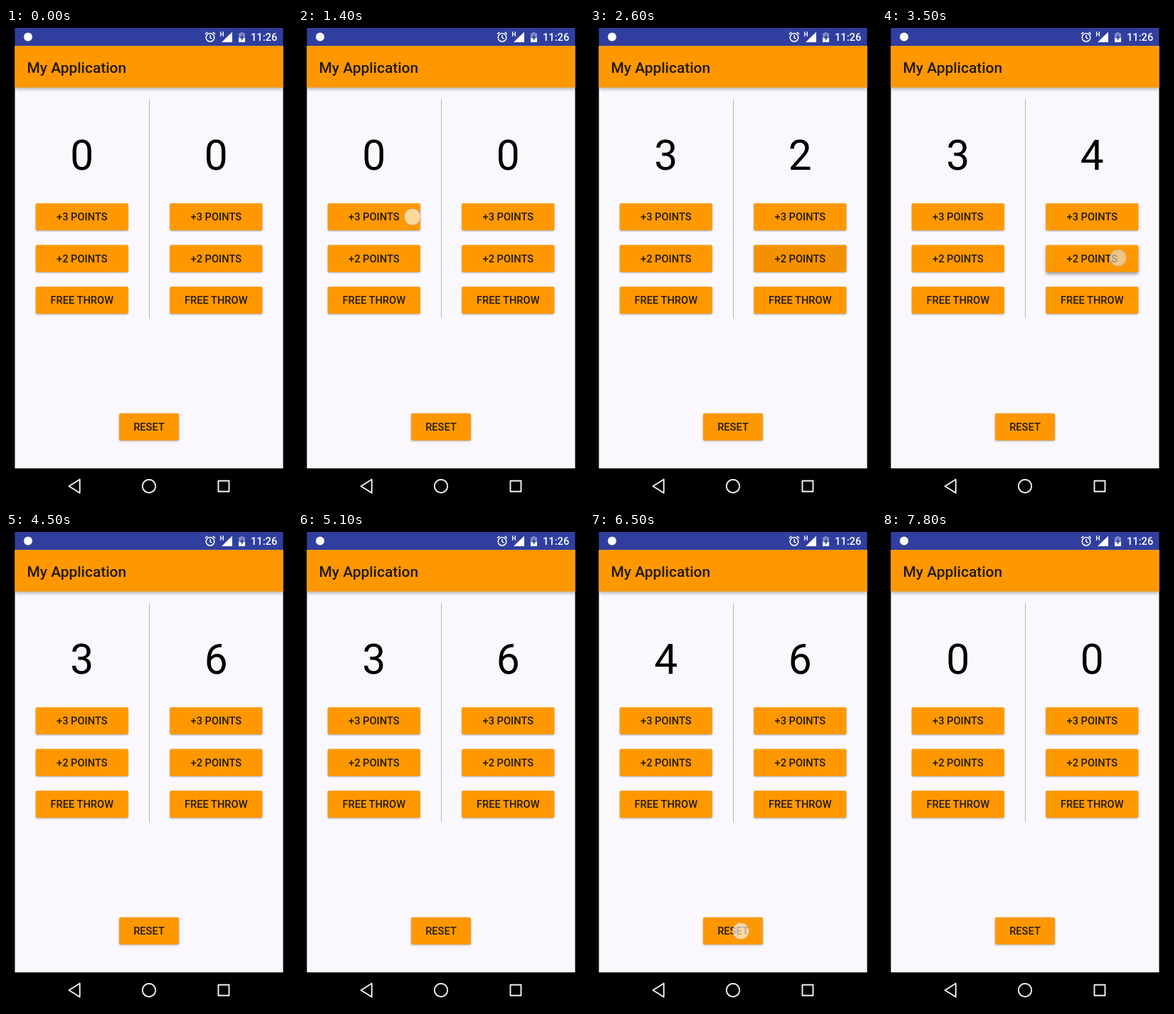
These frames come from a looping animation (402x668 px, 8000 ms). An HTML page:

```html
<!DOCTYPE html>
<html lang="en">
<head>
<meta charset="utf-8">
<title>Score counter</title>
<style>
  html, body { margin: 0; width: 100%; height: 100%; overflow: hidden; background: #000; }
  svg { display: block; width: 402px; height: 668px; font-family: Roboto, sans-serif; }
  .label { font-size: 14.66px; font-weight: 500; fill: #211a10; text-anchor: middle; }
  .score { font-size: 58.6px; fill: #000; text-anchor: middle; }
</style>
</head>
<body>
<svg id="stage" viewBox="0 0 402 668">
  <rect width="402" height="668"/>
  <rect x="12.5" y="25" width="377" height="593" fill="#faf8fc"/>
  <rect x="12.5" y="25" width="377" height="58.5" fill="#ff9800" style="filter:drop-shadow(0 2px 2.5px rgba(0,0,0,.32))"/>
  <rect x="12.5" width="377" height="25" fill="#303f9f"/>
  <text x="29.5" y="62.5" font-size="20.95" font-weight="500" fill="#211a10">My Application</text>

  <!-- status bar -->
  <g fill="#fff">
    <circle cx="31" cy="12.5" r="6"/>
    <g fill="none" stroke="#fff" stroke-width="1.5">
      <circle cx="287" cy="13.3" r="5.8"/>
      <path d="M287 9.8V13.6L289.6 15.2M280 8.6L283.4 5.7M294 8.6L290.6 5.7"/>
    </g>
    <text x="300.5" y="12" font-size="8.5" font-weight="700">H</text>
    <path d="M303 20L318 5.5V20Z"/>
    <path d="M327 7.5H329.5V6H333.5V7.5H336V14H327Z" opacity=".4"/>
    <path d="M327 14H336V20H327Z"/>
    <path d="M332.4 8.5L328.8 14.4H331V18.3L334.4 12.4H332.4Z" fill="#303f9f"/>
    <text x="344" y="18.2" font-size="14.66" font-weight="500">11:26</text>
  </g>

  <rect x="201" y="100" width="1" height="306.5" fill="#b3b1b4"/>
  <text class="score" id="left" x="106.8" y="199"/>
  <text class="score" id="right" x="295.3" y="199"/>
  <g id="buttons"/>
  <circle id="dot" r="11.5" stroke-width="1.5"/>

  <!-- navigation bar -->
  <g fill="none" stroke="#f4f4f4" stroke-width="1.9" stroke-linejoin="round">
    <path d="M103.7 633.5V652.5L88.5 643Z"/>
    <circle cx="201" cy="643" r="9.2"/>
    <rect x="298.5" y="635.5" width="15" height="15"/>
  </g>
</svg>
<script>
const $ = id => document.getElementById(id);
const LOOP = 8000, STEP = 100, FADE = 600;

function add(tag, attrs, text = '') {
  const el = document.createElementNS('http://www.w3.org/2000/svg', tag);
  for (const k in attrs) el.setAttribute(k, attrs[k]);
  el.textContent = text;
  $('buttons').append(el);
  return el;
}

function button(x, y, width, label) {
  const box = { x, y, width, height: 38, rx: 2 };
  const face = add('rect', { ...box, fill: '#ff9800' });
  const shade = add('rect', { ...box, fill: '#000', opacity: 0 });
  add('text', { class: 'label', x: x + width / 2, y: y + 24.4 }, label);
  return { face, shade };
}

const rows = ['+3 POINTS', '+2 POINTS', 'FREE THROW'];
const column = x => rows.map((label, i) => button(x, 246 + i * 58.5, 130, label));
const [left, right] = [column(41.8), column(230.3)];
const reset = button(159, 540.8, 84, 'RESET');
const all = [...left, ...right, reset];

// each tap: start time, button, touch point, change to the scores
const taps = [
  { at: 1400, btn: left[0], x: 161, y: 265, apply: s => { s.left += 3; } },
  ...[2400, 2900, 3400].map(at => (
    { at, btn: right[1], x: 332, y: 322.5, apply: s => { s.right += 2; } })),
  { at: 5600, btn: left[2], x: 143, y: 382.5, apply: s => { s.left += 1; } },
  { at: 6500, btn: reset, x: 212, y: 560, apply: s => { s.left = s.right = 0; } }
];

function draw(t) {
  const score = { left: 0, right: 0 };
  const dot = $('dot');
  dot.style.display = 'none';
  for (const b of all) {
    b.shade.setAttribute('opacity', 0);
    b.face.style.filter = 'drop-shadow(0 1.2px 1px rgba(0,0,0,.32))';
  }
  for (const { at, btn, x, y, apply } of taps) {
    const age = t - at;
    if (age < 0) continue;
    if (age >= 200) apply(score);
    if (age >= 100 && age < 200) btn.face.style.filter = 'drop-shadow(0 3px 2px rgba(0,0,0,.38))';
    if (age >= 200 && age < FADE) btn.shade.setAttribute('opacity', 0.045 * (FADE - age) / (FADE - 200));
    if (age < 200) {
      const fresh = age < 100;
      dot.style.display = '';
      dot.setAttribute('cx', x);
      dot.setAttribute('cy', y);
      dot.setAttribute('fill', fresh ? 'rgba(255,255,255,.62)' : 'rgba(226,226,226,.6)');
      dot.setAttribute('stroke', fresh ? 'rgba(190,165,130,.45)' : 'rgba(190,170,140,.4)');
    }
  }
  $('left').textContent = score.left;
  $('right').textContent = score.right;
}

function tick() {
  const t = performance.now() % LOOP;
  draw(Math.floor(t / STEP) * STEP);
  requestAnimationFrame(tick);
}
tick();
</script>
</body>
</html>
```
